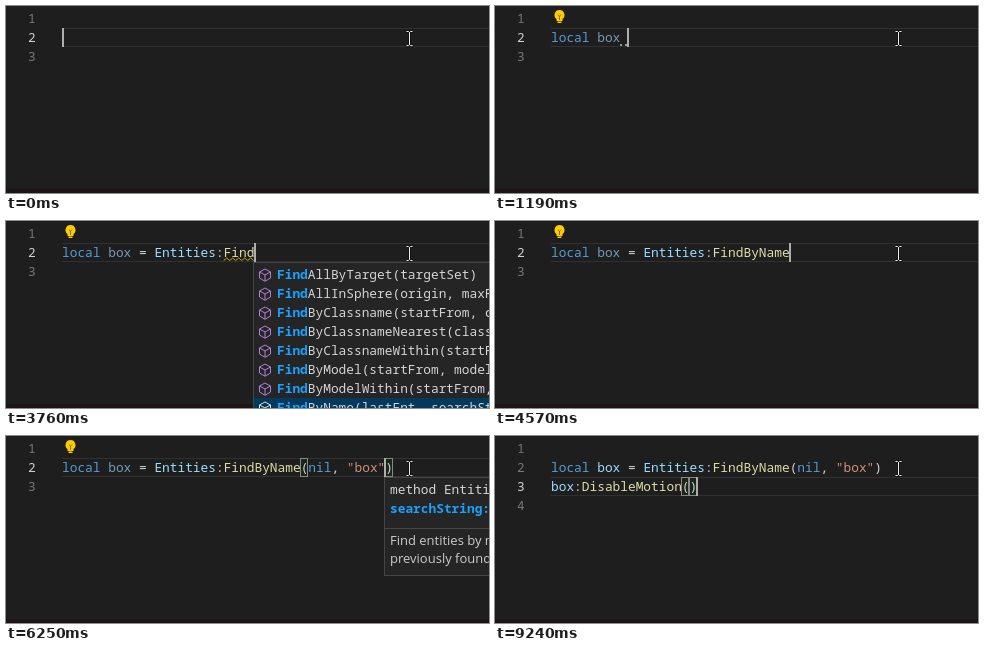
An HTML page that plays this animation: 483x187 px, repeating every 9470 ms.

```html
<!DOCTYPE html>
<html lang="en">
<head>
<meta charset="utf-8">
<title>Code completion</title>
<style>
html, body { margin: 0; width: 100%; height: 100%; overflow: hidden; background: #1e1e1e; }
svg { display: block; width: 483px; height: 187px; }
text { white-space: pre; fill: #d4d4d4; font: 12.83px "Noto Sans Mono", "DejaVu Sans Mono", monospace; }
.doc { font: 13px "Open Sans", "Noto Sans", sans-serif; fill: #ccc; }
.hit { fill: #18a3ff; font-weight: bold; }
.number { fill: #777; }
.number.active { fill: #d0d0d0; }
</style>
</head>
<body>
<svg id="stage" viewBox="0 0 483 187"></svg>
<script>
const LOOP = 9470, LEFT = 56, CHAR = 7.7, LINE = 19;
const PAIRS = { "(": ")", '"': '"' };
const METHODS = [
  "FindAllByTarget(targetSet)", "FindAllInSphere(origin, maxRadius)",
  "FindByClassname(startFrom, classname)", "FindByClassnameNearest(classname, origin, maxRadius)",
  "FindByClassnameWithin(startFrom, classname, origin)", "FindByModel(startFrom, modelName)",
  "FindByModelWithin(startFrom, modelName, origin)", "FindByName(lastEnt, searchString)",
  "FindByNameNearest(name, origin, maxRadius)", "FindByNameWithin(lastEnt, name, origin)"
];
const WORDS = [
  "local", "local function", "load(chunk, chunkname, mode)", "loadstring(text)",
  "Entities", "EntityClass", "EntIndexToHScript(index)", "box", "break", "bit",
  "DisableMotion()", "Disconnect(output)", "Destroy()", ...METHODS
];
// Asterisks enclose the matched letters.
const ARGUMENTS = ["*nil*", "*n*ext(table, *i*ndex)", "FireEntityIOInput*N*ameTo*il*"];

// [time, typed text, other changes]
const EVENTS = [
  [270, "l"], [340, "", { list: {} }], [400, "o", { list: {} }], [470, "c", { list: {} }],
  [540, "a", { list: {} }], [610, "l", { list: {} }], [700, " ", { list: null }],
  [810, "b"], [880, "o"], [950, "x"], [1050, " "],
  [1120, "", { bulb: true }], [1160, "", { dots: true }],
  [1260, "=", { bulb: false }], [1330, " ", { dots: false }],
  [1480, "E"], [1560, "", { list: {} }], [1650, "n", { list: {} }], [1750, "t", { list: {} }],
  [1830, "i", { list: {} }], [1910, "t", { list: {} }], [1990, "i", { list: {} }],
  [2080, "e", { list: {} }], [2170, "s", { list: {} }], [2320, "", { list: null }],
  [2490, ":"], [2930, "F"], [3020, "", { list: { selected: 7, pad: 3, inset: 24 } }],
  [3150, "i", { list: { selected: 7, pad: 3, inset: 24 } }],
  [3300, "", { bulb: true }],
  [3450, "n", { list: { selected: 7, pad: 3, inset: 24 } }],
  [3530, "", { squiggle: [21, 24] }],
  [3630, "d", { list: { selected: 7, pad: 3, inset: 24 }, squiggle: [21, 25] }],
  [3930, "B", { list: { selected: 5 } }], [4030, "y", { list: { selected: 5 } }],
  [4200, "N", { list: {} }], [4570, "ame", { list: null, squiggle: null }],
  [4770, "(", { bulb: false }], [4850, "", { help: {} }],
  [5060, "n", { list: { x: 312, rows: ARGUMENTS, inset: 27 } }],
  [5150, "i", { list: { x: 317, rows: ARGUMENTS, inset: 27 }, squiggle: [32, 34] }],
  [5260, "l", { list: { x: 321, rows: ARGUMENTS, inset: 27 }, help: { x: 321 } }],
  [5480, ",", { list: null, squiggle: null, help: { second: true } }],
  [5600, " ", { help: { second: true } }],
  [5900, '"', { help: { second: true } }], [6000, "b", { help: { second: true } }],
  [6070, "o", { help: { second: true } }], [6140, "x", { help: { second: true } }],
  [6200, '"', { help: { second: true } }], [6230, "", { bulb: true }],
  [6380, ")", { help: null, bulb: false }], [6650, "\n"],
  [7060, "b"], [7130, "", { list: {} }], [7200, "o", { list: {} }], [7290, "x", { list: {} }],
  [7450, "", { used: true }], [7600, ":", { list: null }],
  [8110, "D"], [8170, "", { list: {} }], [8230, "i", { list: {} }], [8300, "s", { list: {} }],
  [8440, "ableMotion", { list: null }], [8600, "("], [8740, ")"],
  [8970, "", { blink: true }], [9240, "", { blink: false }]
];

const columnX = column => LEFT + CHAR * column;
const rect = (x, y, w, h, fill, extra = "") =>
  `<rect x="${x}" y="${y}" width="${w}" height="${h}" fill="${fill}" ${extra}/>`;
const path = (d, stroke, extra = "") => `<path d="${d}" fill="none" stroke="${stroke}" ${extra}/>`;
const text = (x, y, body, cls = "") => `<text x="${x}" y="${y}" class="${cls}">${body}</text>`;
const hit = body => `<tspan class="hit">${body}</tspan>`;

function type(state, typed) {
  if (typed === "\n") {
    state.row++;
    state.column = 0;
    return;
  }
  const line = state.lines[state.row];
  const before = line.slice(0, state.column), after = line.slice(state.column);
  const typedOver = typed && Object.values(PAIRS).includes(typed) && after[0] === typed;
  if (!typedOver) state.lines[state.row] = before + typed + (PAIRS[typed] || "") + after;
  state.column += typed.length;
}

function stateAfter(count) {
  const state = { lines: ["", ""], row: 0, column: 0 };
  for (const [, typed, changes] of EVENTS.slice(0, count)) {
    type(state, typed);
    Object.assign(state, changes);
    const x = Math.round(columnX(state.column) - 1.5);
    if (changes?.list) {
      const query = state.lines[state.row].slice(0, state.column).match(/\w*$/)[0];
      const rows = WORDS.filter(word => word.startsWith(query))
        .map(word => `*${query}*${word.slice(query.length)}`);
      state.list = { x, rows, selected: 0, pad: 1, inset: 26, ...changes.list };
    }
    if (changes?.help) state.help = { x, ...changes.help };
  }
  return state;
}

function colorize(line, faded) {
  return line.replace(/"[^"]*"?|:\w+|\w+/g, token => {
    const span = (color, body) => `<tspan fill="${color}">${body}</tspan>`;
    if (token[0] === '"') return span("#ce9178", token);
    if (token[0] === ":") return ":" + span("#dcdcaa", token.slice(1));
    if (/^(local|nil)$/.test(token)) return span("#569cd6", token);
    return span(faded && token === "box" ? "#729cb3" : "#9cdcfe", token);
  });
}

function brackets({ lines, row, column }, top) {
  const line = lines[row];
  if (!/[()]/.test(line.slice(Math.max(0, column - 1), column + 1))) return "";
  return ["(", ")"].map(mark => rect(Math.floor(columnX(line.indexOf(mark))) + .5, top + .5, 7, 18,
    "#00640020", 'stroke="#888"')).join("");
}

function squiggle([from, to]) {
  let d = `M${columnX(from)} 39.5`;
  for (let x = columnX(from), up = true; x < columnX(to) - 2; x += 3, up = !up)
    d += `l3 ${up ? -2.5 : 2.5}`;
  return path(d, "#cca700");
}

function bulb() {
  return `<path d="M64.5 4a5 5 0 0 0-3 9v2h6v-2a5 5 0 0 0-3-9z" fill="#fc0"/>` +
    rect(62.5, 15.5, 4, 1.5, "#fc0") + path("M62.8 8.5l1.7 1.7 1.7-1.7M64.5 10v4", "#6b5600", 'stroke-width=".8"');
}

function icon(x, y, keyword, active) {
  const d = keyword
    ? "M1 3h4M6 3h7M1 6h8M10 6h3M1 9h3M5 9h8M1 12h7"
    : "M7 1l5.5 3v6L7 13.3 1.5 10V4zM1.5 4L7 7l5.5-3M7 7v6";
  return path(d, active || keyword ? "#e0e0e0" : "#b180d7", `transform="translate(${x} ${y})"`);
}

function suggestions({ x, rows, selected, pad, inset }, top) {
  const body = rows.map((row, i) => {
    const y = top + pad + i * LINE;
    const active = i === selected;
    return (active ? rect(x + 1, y, 500, LINE, "#04395e") : "") +
      icon(x + inset - 19, y + 3, /^\*\w+\*?\w*( function)?$/.test(row), active) +
      text(x + inset, y + 14, row.replace(/\*([^*]*)\*/g, (_, match) => hit(match)));
  }).join("");
  return rect(x + .5, top + .5, 500, rows.length * LINE + pad, "#252526", 'stroke="#454545"') + body;
}

function signature({ x, second }) {
  const first = "lastEnt: handle", last = "searchString: string";
  return rect(x + .5, 41.5, 500, 98, "#252526", 'stroke="#454545"') +
    text(x + 6, 58, `method Entities:FindByName(${second ? first : hit(first)},`) +
    text(x + 6, 77, (second ? hit(last) : last) + ")") +
    rect(x + 1, 92, 500, 1, "#454545") +
    text(x + 6, 109, "Find entities by name. Pass nil to start an iteration, or a", "doc") +
    text(x + 6, 127, "previously found entity to continue a search", "doc");
}

function pointer() {
  const d = "M400.5 25.5h2l1 1 1-1h2M403.5 26v13M400.5 39.5h2l1-1 1 1h2";
  return path(d, "#000", 'stroke-width="2.4" opacity=".5"') + path(d, "#eee");
}

function draw(state) {
  const top = 22 + LINE * state.row;
  const parts = [
    rect(0, 183, 483, 4, "#1c1417"),
    rect(LEFT, top, 427, 1, "#303030"), rect(LEFT, top + 18, 427, 1, "#303030")
  ];
  for (let n = 1; n <= 3 + state.row; n++)
    parts.push(text(22, 17 + LINE * (n - 1), n, n === state.row + 2 ? "number active" : "number"));
  parts.push(brackets(state, top));
  state.lines.forEach((line, i) => parts.push(text(LEFT, 36 + LINE * i, colorize(line, !state.used))));
  if (state.squiggle) parts.push(squiggle(state.squiggle));
  if (state.dots) parts.push(rect(125, 38, 2, 2, "#999"), rect(130, 38, 2, 2, "#999"));
  if (state.bulb) parts.push(bulb());
  if (!state.blink)
    parts.push(rect(Math.max(LEFT, Math.round(columnX(state.column) - 1)), top, 2, LINE, "#aeafad"));
  if (state.help) parts.push(signature(state.help));
  if (state.list) parts.push(suggestions(state.list, top + LINE));
  parts.push(pointer());
  document.getElementById("stage").innerHTML = parts.join("");
}

const start = performance.now();
let shown = -1;
function tick() {
  const time = (performance.now() - start) % LOOP;
  const count = EVENTS.filter(([at]) => at <= time).length;
  if (count !== shown) draw(stateAfter(shown = count));
  requestAnimationFrame(tick);
}
tick();
</script>
</body>
</html>
```
